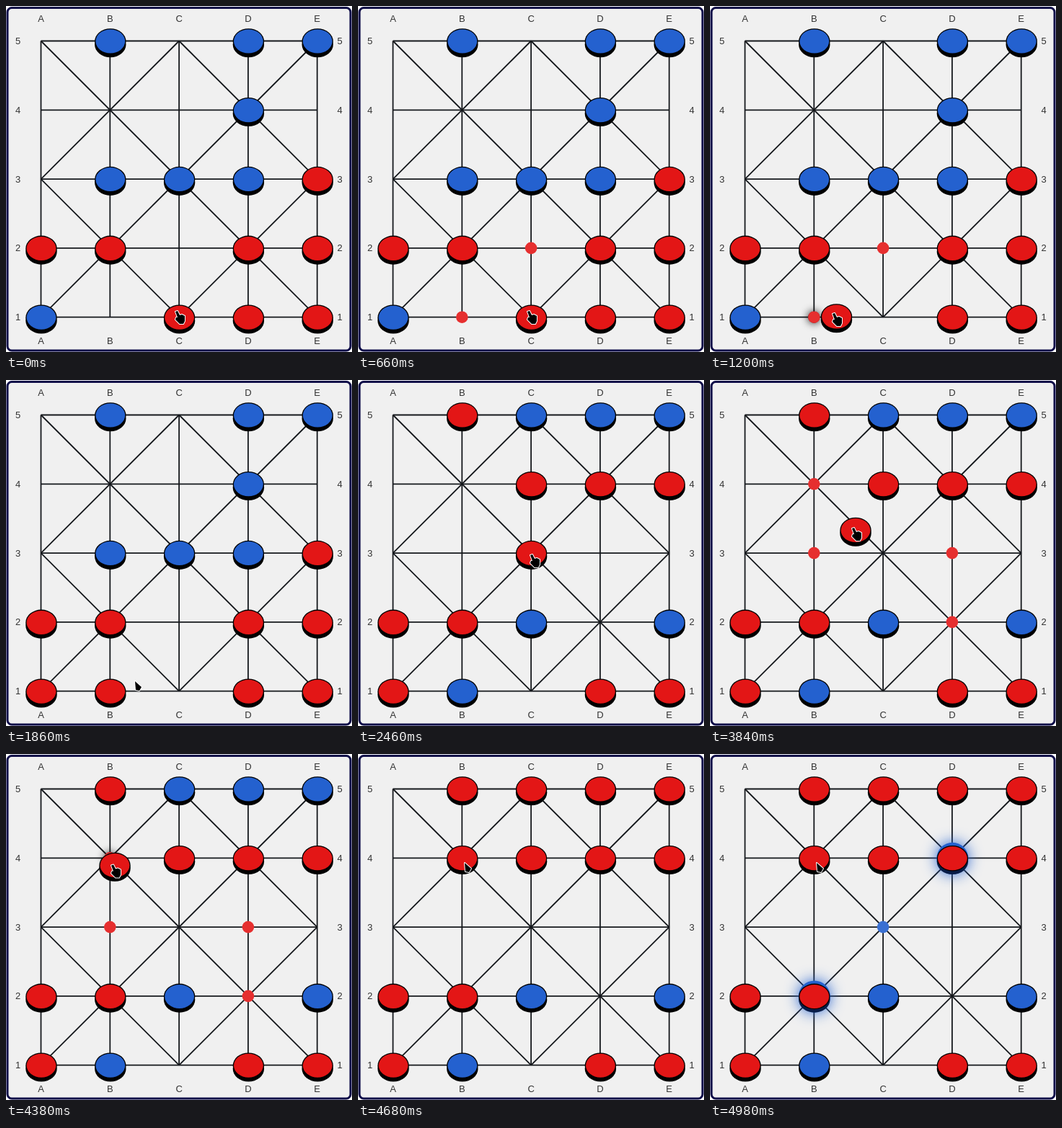
Write an HTML page with a canvas that moves like this. It is 480 px wide and 480 px high and loops after 5.11 s.

```html
<!DOCTYPE html>
<html>
<head>
<meta charset="utf-8">
<style>
  html, body { margin: 0; width: 100%; height: 100%; overflow: hidden; background: #fff; }
  canvas { display: block; }
</style>
</head>
<body>
<canvas id="stage" width="480" height="480"></canvas>
<script>
const ctx = document.getElementById('stage').getContext('2d');
const LOOP = 5110, STEP = 60, LAST = 4980;
const RED = '#e31616', BLUE = '#2461cf';
const at = i => 48.5 + 95.8 * i;

// Columns A to E count from the left, rows 5 to 1 from the top.
const scenes = [
  {
    start: 0, rows: ['.b.bb', '...b.', '.bbbr', 'rr.rr', 'b.rrr'],
    from: [2, 4], to: [1, 4], hints: [[2, 3], [1, 4]], captured: [[0, 4]],
    pick: 660, drag: 840, drop: 1500, capture: 1680,
    piece: [[840, 240.5, 432], [1200, 175.5, 431], [1380, 147, 432]],
    cursor: [[840, 235, 424], [1200, 170, 427], [1380, 141, 428], [1620, 141, 428], [1860, 179, 418]]
  },
  {
    start: 2280, rows: ['.rbbb', '..rrr', '..r..', 'rrb.b', 'rb.rr'],
    from: [2, 2], to: [1, 1], hints: [[1, 1], [1, 2], [3, 2], [3, 3]],
    captured: [[2, 0], [3, 0], [4, 0]],
    pick: 3300, drag: 3540, drop: 4500, capture: 4680,
    piece: [[3540, 240.5, 240.5], [3840, 202, 208.5], [4140, 160, 167], [4380, 151, 154.5]],
    cursor: [[3540, 239, 243], [3840, 197, 206], [4140, 155, 166], [4380, 146, 154.5], [4560, 148, 151]],
    reply: { time: 4800, spot: [2, 2], targets: [[1, 3], [3, 1]] }
  }
];

const HAND = [[0, 0], [3, -1], [6, 5], [9, 4], [13, 6], [13, 13], [11, 17], [6, 17], [0, 11], [1, 8], [3, 8]];
const ARROW = [[0, 0], [9, 8], [6, 13], [1, 12]];

const same = (a, b) => a[0] === b[0] && a[1] === b[1];
const has = (list, p) => list.some(q => same(p, q));

function along(keys, t) {
  if (t <= keys[0][0]) return keys[0].slice(1);
  for (let i = 1; i < keys.length; i++) {
    const [t0, x0, y0] = keys[i - 1], [t1, x1, y1] = keys[i];
    if (t < t1) {
      const k = (t - t0) / (t1 - t0);
      return [x0 + (x1 - x0) * k, y0 + (y1 - y0) * k];
    }
  }
  return keys[keys.length - 1].slice(1);
}

function ellipse(x, y, rx, ry, fill) {
  ctx.beginPath();
  ctx.ellipse(x, y, rx, ry, 0, 0, 7);
  ctx.fillStyle = fill;
  ctx.fill();
}

function glow(x, y, r, color, blur) {
  ctx.save();
  ctx.shadowColor = color;
  ctx.shadowBlur = blur;
  ellipse(x, y, r, r, color);
  ctx.restore();
}

function line(a, b, c, d) {
  ctx.beginPath();
  ctx.moveTo(at(a), at(b));
  ctx.lineTo(at(c), at(d));
  ctx.stroke();
}

function drawBoard() {
  ctx.fillStyle = '#fff';
  ctx.fillRect(0, 0, 480, 480);
  ctx.beginPath();
  ctx.roundRect(2, 2.5, 476, 475.5, 6);
  ctx.fillStyle = '#f0f0f0';
  ctx.fill();
  ctx.strokeStyle = '#0c0a48';
  ctx.lineWidth = 3;
  ctx.stroke();

  ctx.strokeStyle = '#15181c';
  ctx.lineWidth = 1.8;
  for (let i = 0; i < 5; i++) {
    line(i, 0, i, 4);
    line(0, i, 4, i);
  }
  line(0, 0, 4, 4);
  line(0, 4, 4, 0);
  line(0, 2, 2, 0);
  line(2, 0, 4, 2);
  line(4, 2, 2, 4);
  line(2, 4, 0, 2);

  ctx.fillStyle = '#333';
  ctx.font = '13px "Liberation Sans", Arial, sans-serif';
  ctx.textAlign = 'center';
  for (let i = 0; i < 5; i++) {
    ctx.fillText('ABCDE'[i], at(i), 21.5);
    ctx.fillText('ABCDE'[i], at(i), 469);
    ctx.fillText(5 - i, 16.5, at(i) + 4.5);
    ctx.fillText(5 - i, 463, at(i) + 4.5);
  }
}

function drawPiece(x, y, color, threatened) {
  if (threatened) glow(x, y, 22, BLUE, 20);
  ellipse(x, y + 4.5, 21.7, 17.8, threatened ? '#071c48' : '#000');
  ellipse(x, y, 21.7, 17.8, '#000');
  ellipse(x, y, 20.4, 16.5, color);
}

function drawHint([c, r], color, hovered) {
  if (hovered) glow(at(c), at(r), 8, '#000', 12);
  ellipse(at(c), at(r), 8.3, 8.3, color);
}

function drawCursor([x, y], shape) {
  ctx.beginPath();
  shape.forEach(([dx, dy]) => ctx.lineTo(x + dx, y + dy));
  ctx.closePath();
  ctx.lineJoin = 'round';
  ctx.lineWidth = 2;
  ctx.strokeStyle = '#fff';
  ctx.stroke();
  ctx.fillStyle = '#000';
  ctx.fill();
}

function draw(t) {
  const s = scenes[t < scenes[1].start ? 0 : 1];
  const dragging = t >= s.drag && t < s.drop;
  const dropped = t >= s.drop;
  const held = along(s.piece, t);
  const reply = s.reply && t >= s.reply.time ? s.reply : null;

  drawBoard();
  if (t >= s.pick && !dropped) {
    for (const h of s.hints) {
      const near = Math.hypot(held[0] - at(h[0]), held[1] - at(h[1])) < 46;
      drawHint(h, '#e62f2f', dragging && near);
    }
  }
  if (reply) drawHint(reply.spot, '#3a70d2');

  s.rows.forEach((row, r) => [...row].forEach((cell, c) => {
    const p = [c, r];
    if (same(p, s.from) && (dragging || dropped)) return;
    if (same(p, s.to) && dropped) cell = 'r';
    if (has(s.captured, p) && t >= s.capture) cell = 'r';
    if (cell === '.') return;
    drawPiece(at(c) + 0.5, at(r) + 0.5, cell === 'r' ? RED : BLUE, reply && has(reply.targets, p));
  }));

  if (dragging) drawPiece(...held, RED);
  drawCursor(along(s.cursor, t), dropped ? ARROW : HAND);
}

function tick() {
  const t = performance.now() % LOOP;
  draw(Math.min(LAST, Math.floor(t / STEP) * STEP));
  requestAnimationFrame(tick);
}
tick();
</script>
</body>
</html>
```
